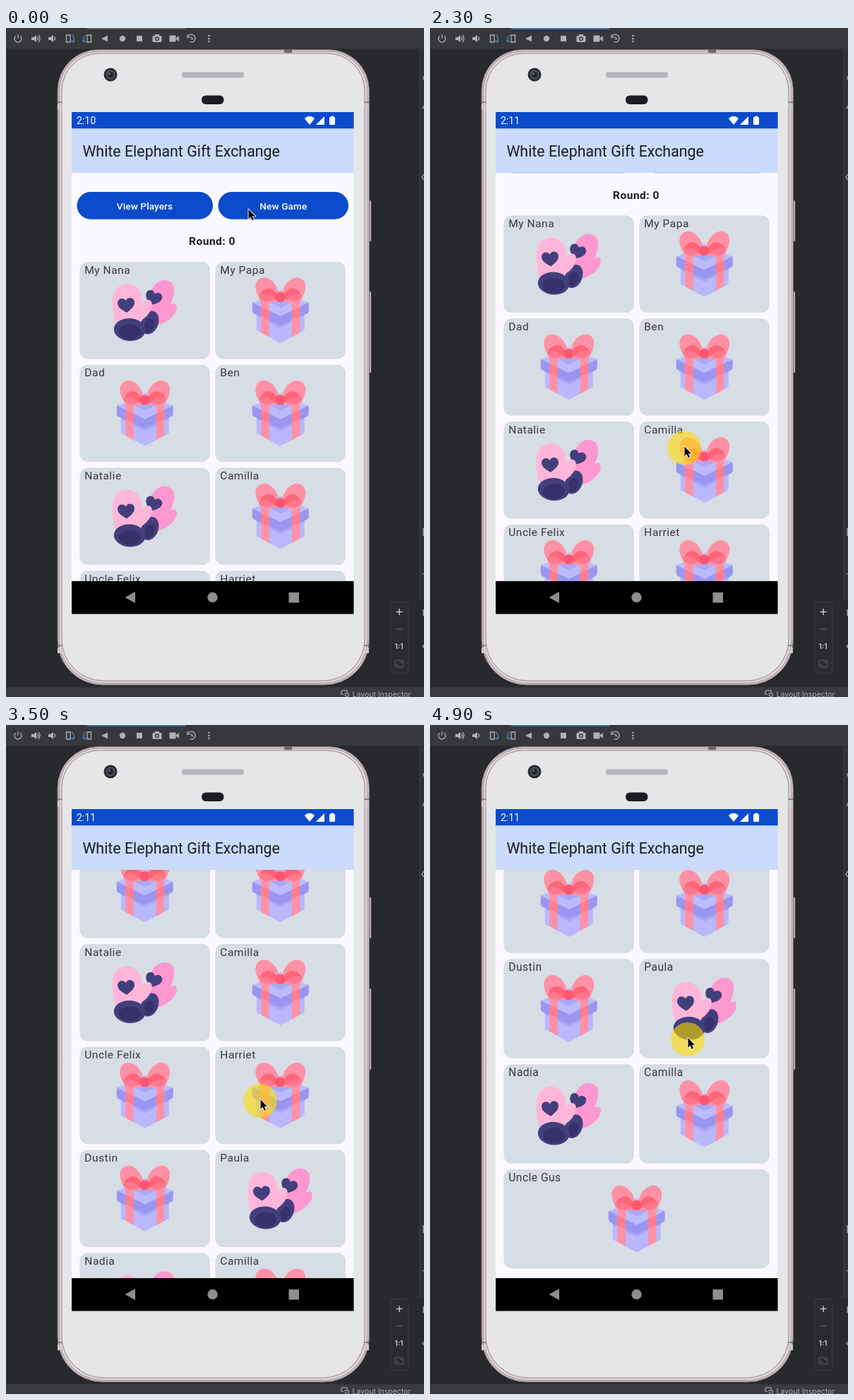
Animation of 592 by 947 pixels, one loop 5000 ms. Source, as an HTML page with a canvas:

```html
<!DOCTYPE html>
<html lang="en">
<head>
<meta charset="utf-8">
<title>Gift exchange app</title>
<style>
html, body { margin: 0; width: 100%; height: 100%; overflow: hidden; background: #27292c; }
canvas { display: block; width: 592px; height: 947px; }
</style>
</head>
<body>
<canvas id="stage"></canvas>
<script>
const W = 592, H = 947, LOOP = 5000, STEP = 100;
const canvas = document.getElementById('stage');
const dpr = window.devicePixelRatio || 1;
canvas.width = W * dpr;
canvas.height = H * dpr;
const c = canvas.getContext('2d');

const BLUE = '#0b4bcb', ICON = '#afb1b3', NAVY = '#423f7d';
const VIEW = { x: 93, y: 205, w: 399.5, h: 578 };
const ROW = 145.75, FIRST = 331;
const MID = 292.75;

// Each entry: label, prize is open
const cards = [
  ['My Nana', 1], ['My Papa', 0], ['Dad', 0], ['Ben', 0],
  ['Natalie', 1], ['Camilla', 0], ['Uncle Felix', 0], ['Harriet', 0],
  ['Dustin', 0], ['Paula', 1], ['Nadia', 1], ['Camilla', 0], ['Uncle Gus', 0]
];

const pointerX = [[0, 343], [600, 299], [1000, 299], [1700, 335], [2000, 357], [2300, 360], [2700, 358],
  [2900, 362], [3200, 366], [3500, 360], [3800, 350], [3900, 350], [4600, 366], [4900, 365]];
const pointerY = [[0, 256.5], [600, 196], [1000, 196], [1700, 663], [2000, 666], [2300, 592.5], [2700, 514],
  [2900, 563], [3200, 622], [3500, 530], [3800, 404], [3900, 402], [4500, 502], [4600, 500], [4900, 443]];
const scrollKeys = [[2000, 0], [2300, 65.5], [2700, 138], [2900, 161], [3200, 207], [3500, 312.5],
  [3900, 450], [4200, 543], [4500, 573.2]];
const stretchKeys = [[4600, 0], [4900, 0.0215]];
const presses = [[2000, 2700], [3200, 3800], [4600, 5000]];

// Monotone cubic through [time, value] keys
function track(keys, t) {
  const n = keys.length - 1;
  if (t <= keys[0][0]) return keys[0][1];
  if (t >= keys[n][0]) return keys[n][1];
  let i = 0;
  while (t >= keys[i + 1][0]) i++;
  const rate = k => (keys[k + 1][1] - keys[k][1]) / (keys[k + 1][0] - keys[k][0]);
  const slope = k => {
    if (k === 0 || k === n) return 0;
    const a = rate(k - 1), b = rate(k);
    return a * b <= 0 ? 0 : 2 * a * b / (a + b);
  };
  const [t0, a] = keys[i], [t1, b] = keys[i + 1];
  const d = t1 - t0, u = (t - t0) / d, v = 1 - u;
  return a * v * v * (1 + 2 * u) + b * u * u * (3 - 2 * u) +
    d * u * v * (slope(i) * v - slope(i + 1) * u);
}

function rect(x, y, w, h, fill) {
  c.fillStyle = fill;
  c.fillRect(x, y, w, h);
}

function round(x, y, w, h, r, fill, stroke, line = 1) {
  c.beginPath();
  c.roundRect(x, y, w, h, r);
  if (fill) { c.fillStyle = fill; c.fill(); }
  if (stroke) { c.strokeStyle = stroke; c.lineWidth = line; c.stroke(); }
}

function oval(x, y, rx, ry, fill, turn = 0) {
  c.beginPath();
  c.ellipse(x, y, rx, ry, turn, 0, 7);
  c.fillStyle = fill;
  c.fill();
}

function poly(fill, ...p) {
  c.beginPath();
  for (let i = 0; i < p.length; i += 2) c.lineTo(p[i], p[i + 1]);
  c.closePath();
  c.fillStyle = fill;
  c.fill();
}

function shape(d, fill) {
  c.fillStyle = fill;
  c.fill(new Path2D(d));
}

function line(d, color = ICON, width = 1.3) {
  c.strokeStyle = color;
  c.lineWidth = width;
  c.stroke(new Path2D(d));
}

function text(s, x, y, font, fill, spacing = 0) {
  c.font = font;
  c.fillStyle = fill;
  c.letterSpacing = spacing + 'px';
  c.fillText(s, x, y);
}

function at(x, y, draw) {
  c.save();
  c.translate(x, y);
  draw();
  c.restore();
}

function toolbar(active) {
  rect(0, 0, W, 29, '#36383b');
  rect(0, 29, W, 1, '#2e3033');
  rect(115, 0, 139, 1.6, active ? '#4a7fc6' : '#65676a');
  at(17, 15, () => line('M-3.4 -3.6A5 5 0 1 0 3.4 -3.6M0 -6V0'));
  for (const x of [42, 66]) at(x, 15, () => {
    poly(ICON, -6, -2, -3, -2, 1, -5, 1, 5, -3, 2, -6, 2);
    line('M2.5 -2.5Q4.500 0 2.500 2.500');
    if (x === 42) line('M4 -5Q8 0 4 5');
  });
  for (const s of [1, -1]) at(s > 0 ? 91 : 115, 15, () => {
    c.scale(s, 1);
    line('M-5.500 -5H0V5H-5.500Z');
    line('M2 -5Q7 -2 4 5M4 5L1.500 3M4 5L6.500 2.500', '#4d86c6');
  });
  poly(ICON, 135, 15, 144, 10.5, 144, 19.5);
  oval(165, 15, 4.2, 4.2, ICON);
  rect(185, 11, 8, 8, ICON);
  round(207.5, 11, 13, 9, 1.5, ICON);
  rect(211, 9, 6, 3, ICON);
  oval(214, 15.3, 3, 3, '#36383b');
  oval(214, 15.3, 1.6, 1.6, ICON);
  round(231.5, 10.5, 9, 9, 1, ICON);
  poly(ICON, 240, 15, 245, 11, 245, 19);
  at(263, 15, () => line('M-5 -3.500A5.500 5.500 0 1 1 -3 4.500M-6 -6V-2H-2M0 -3V0.500H2.500'));
  for (const y of [11, 15, 19]) oval(287.5, y, 1.3, 1.3, ICON);
}

function sidePanels() {
  rect(586, 30, 6, 780, '#303235');
  rect(585.5, 0, 1, 810, '#3d3f42');
  rect(590.5, 68, 1.5, 5, '#8d8f92');
  line('M592 110L590 115M592 207L589 211L592 215', '#a0a2a5');
  rect(590.5, 708, 1.5, 11, '#a0a2a5');
  rect(589.5, 772, 2.5, 1, '#a0a2a5');
  rect(590.5, 823, 1.5, 9, '#a0a2a5');
  line('M592 873L590 875L592 878', '#a0a2a5');
  round(544.5, 812.5, 25, 101, 3, '#292b2e', '#393b3e');
  line('M552.500 826.500H561.500M557 822V831', '#c2c4c6', 1.5);
  line('M552.500 851H561.500', '#5a5c5f', 1.3);
  text('1:1', 550.5, 879, 'bold 10px Inter, sans-serif', '#bbbdbf');
  round(551, 895, 12, 10, 1, null, '#54565a');
  line('M553.500 900V902.500H556M558 897.500H560.500V900', '#54565a');
  rect(0, 933, W, 14, '#393b3e');
  rect(0, 932.5, W, 1, '#303235');
  line('M475 938H483V941M475 938V943H478M479 942H485V947', ICON, 1.1);
  line('M480 944L484 948', ICON, 1.1);
  text('Layout Inspector', 490.5, 946.7, '10.5px Inter, sans-serif', '#a9abad');
}

function phone() {
  const edge = '#756b6e';
  round(513, 244, 4, 58, 1.5, '#c9bfc2', edge, 0.7);
  round(513, 373, 4, 115, 1.5, '#c9bfc2', edge, 0.7);
  round(73, 30.5, 441.5, 899.5, [58, 58, 64, 64], '#c9bfc2', edge, 1);
  round(75.5, 33, 436.5, 894.5, [56, 56, 62, 62], '#ded5d7', '#a4989b', 1);
  round(79, 36, 429, 888, [53, 53, 59, 59], '#e6e6e9', '#918689', 1);
  for (const x of [73, 507.5]) for (const y of [104, 873]) {
    rect(x, y, 6.5, 2, '#898082');
    rect(x, y + 4, 6.5, 8, '#cfc6c8');
  }
  rect(394, 30.5, 11, 4.5, '#706669');
  oval(148, 66, 9.5, 9.5, '#292b2f');
  oval(148, 66, 6.5, 6.5, '#54585e');
  oval(148, 66, 4.5, 4.5, '#24272e');
  oval(146.5, 64.5, 1.5, 1.5, '#62717e');
  round(249, 62.5, 88, 8, 3, '#b4b5b8', '#d3d3d6');
  round(277, 95.5, 31.5, 12.5, 6, '#1b1c20');
}

function gift() {
  poly('#b9b8fd', -34, 65, 0, 82, 34, 65, 34, 97, 0, 115, -34, 97);
  poly('#a9a7f7', -34, 72, 0, 90, 34, 72, 34, 76, 0, 94, -34, 76);
  shape('M-40 60Q-40 57 -37 57L0 75L37 57Q40 57 40 60V69Q40 72 37 73.500L0 90L-37 73.500Q-40 72 -40 69Z', '#9896f1');
  poly('#bcbbff', -39, 58, 0, 40, 39, 58, 0, 77);
  poly('#aaa8f8', -14, 58, 0, 65, 14, 58, 6, 50, -6, 50);
  for (const s of [-1, 1]) {
    c.save();
    c.scale(s, 1);
    poly('#ff91a6', 16, 55, 27.5, 54, 27.5, 100, 16, 106.500);
    poly('#ff7c91', 16, 69, 27.5, 64, 27.5, 77, 16, 82);
    shape('M2 45C7 24 23 18 31 25C37 30 37 39 31 50C29 56 25 58 21 57C13 59 5 57 1 53Z', '#ff91a6');
    shape('M4 48C10 35 23 33 30 48C25 53 12 56 4 51Z', '#ff6579');
    shape('M9 52C16 45 28 44 31 48C27 57 16 59 9 52Z', '#ff788d');
    c.restore();
  }
  round(-7, 43, 13.500, 13.500, 5.500, '#ff566f');
}

function heart(x, y, size, turn) {
  at(x, y, () => {
    c.rotate(turn);
    c.scale(size, size);
    shape('M0 -6C3 -12 12 -10 12 -3C12 4 4 8 0 11C-4 8 -12 4 -12 -3C-12 -10 -3 -12 0 -6Z', NAVY);
  });
}

function mittens() {
  shape('M-2 78C0 62 3 50 9 40C15 28 27 22 37 29C45 36 41 50 36 61C42 56 46 60 45 66C44 74 34 85 20 89Z', '#ff97d0');
  heart(12, 51, 0.98, 0.35);
  oval(7, 86, 12, 17, NAVY, 0.35);
  oval(6, 90, 7, 10, '#34316b', 0.35);
  shape('M-42 87C-46 72 -47 59 -45 48C-42 34 -28 28 -17 33C-7 38 -3 48 -4 60C0 52 9 52 10 59C11 68 3 78 -4 82L-12 93Z', '#ffb6d9');
  heart(-26.5, 61, 1, -0.08);
  oval(-21.5, 96, 22.5, 16, NAVY, 0.06);
  oval(-21.5, 99, 15.5, 10.5, '#34316b');
}

function button(x, w, label, tx) {
  round(x, 232, w, 38.800, 19.4, BLUE);
  text(label, tx, 256.7, '500 13.6px Roboto, sans-serif', '#fff', 0.1);
}

function content(scroll, stretch) {
  c.save();
  c.beginPath();
  c.rect(VIEW.x, VIEW.y, VIEW.w, VIEW.h);
  c.clip();
  rect(VIEW.x, VIEW.y, VIEW.w, VIEW.h, '#fbf9fe');
  const bottom = VIEW.y + VIEW.h;
  c.translate(0, bottom);
  c.scale(1, 1 + stretch);
  c.translate(0, -bottom - scroll);
  button(100.5, 192.500, 'View Players', 156.8);
  button(300.5, 184.500, 'New Game', 359.3);
  text('Round: 0', 259, 307, 'bold 15.55px Roboto, sans-serif', '#1b1c20', 0.49);
  cards.forEach(([label, open], i) => {
    const wide = i === cards.length - 1;
    const x = i % 2 ? 296.5 : 104.5, w = wide ? 376.500 : 184.500;
    const y = FIRST + ROW * (i >> 1);
    if (y - scroll > bottom || y + ROW - scroll < VIEW.y - 20) return;
    round(x, y, w, 137.500, 11.5, '#d7dde4');
    text(label, x + 6.8, y + 16.7, '15.55px Roboto, sans-serif', '#37393e', 0.49);
    at(wide ? MID : x + w / 2, y, open ? mittens : gift);
  });
  c.restore();
}

function systemBars(clock) {
  rect(VIEW.x, 119, VIEW.w, 23.5, BLUE);
  text(clock, 100, 136, '14px Roboto, sans-serif', '#fff');
  shape('M430 137L422.800 128Q430 121.500 437.200 128Z', '#fff');
  poly('#fff', 439, 137, 451, 137, 451, 125);
  round(458, 126, 8, 11, 1, '#fff');
  rect(460, 124.7, 4, 2, '#fff');
  rect(VIEW.x, 142.5, VIEW.w, 62.5, '#cadbfb');
  text('White Elephant Gift Exchange', 108.4, 182.2, '21.38px Roboto, sans-serif', '#191b20');
  rect(VIEW.x, 783, VIEW.w, 46.5, '#000');
  poly('#8e8e8e', 168.5, 806, 183, 798, 183, 814);
  oval(292.5, 806, 7.2, 7.2, '#8e8e8e');
  rect(400.5, 799, 14.5, 14.5, '#8e8e8e');
}

function touches(t) {
  for (const [down, up] of presses) {
    const age = Math.max(0, t - up);
    if (t < down || age >= 400) continue;
    const p = Math.min(t, up);
    const r = 24 + age * 0.03;
    c.globalAlpha = 0.6 * (1 - (age / 400) ** 3);
    oval(track(pointerX, p), track(pointerY, p) + 2, r, r, '#ffde00');
    c.globalAlpha = 1;
  }
}

function pointer(x, y) {
  at(x, y, () => {
    const arrow = new Path2D('M0.500 0V13.500L3.600 10.700L5.800 15.800L8 14.800L5.900 9.900H10Z');
    c.lineJoin = 'round';
    c.strokeStyle = '#fff';
    c.lineWidth = 1.8;
    c.stroke(arrow);
    c.fillStyle = '#000';
    c.fill(arrow);
  });
}

function draw(t) {
  c.setTransform(dpr, 0, 0, dpr, 0, 0);
  rect(0, 0, W, H, '#27292c');
  toolbar(t >= 2000);
  sidePanels();
  phone();
  content(track(scrollKeys, t), track(stretchKeys, t));
  systemBars(t < 1000 ? '2:10' : '2:11');
  touches(t);
  pointer(track(pointerX, t), track(pointerY, t));
}

const start = performance.now();
function tick() {
  const t = (performance.now() - start) % LOOP;
  draw(Math.floor(t / STEP) * STEP);
  requestAnimationFrame(tick);
}
tick();
</script>
</body>
</html>
```
